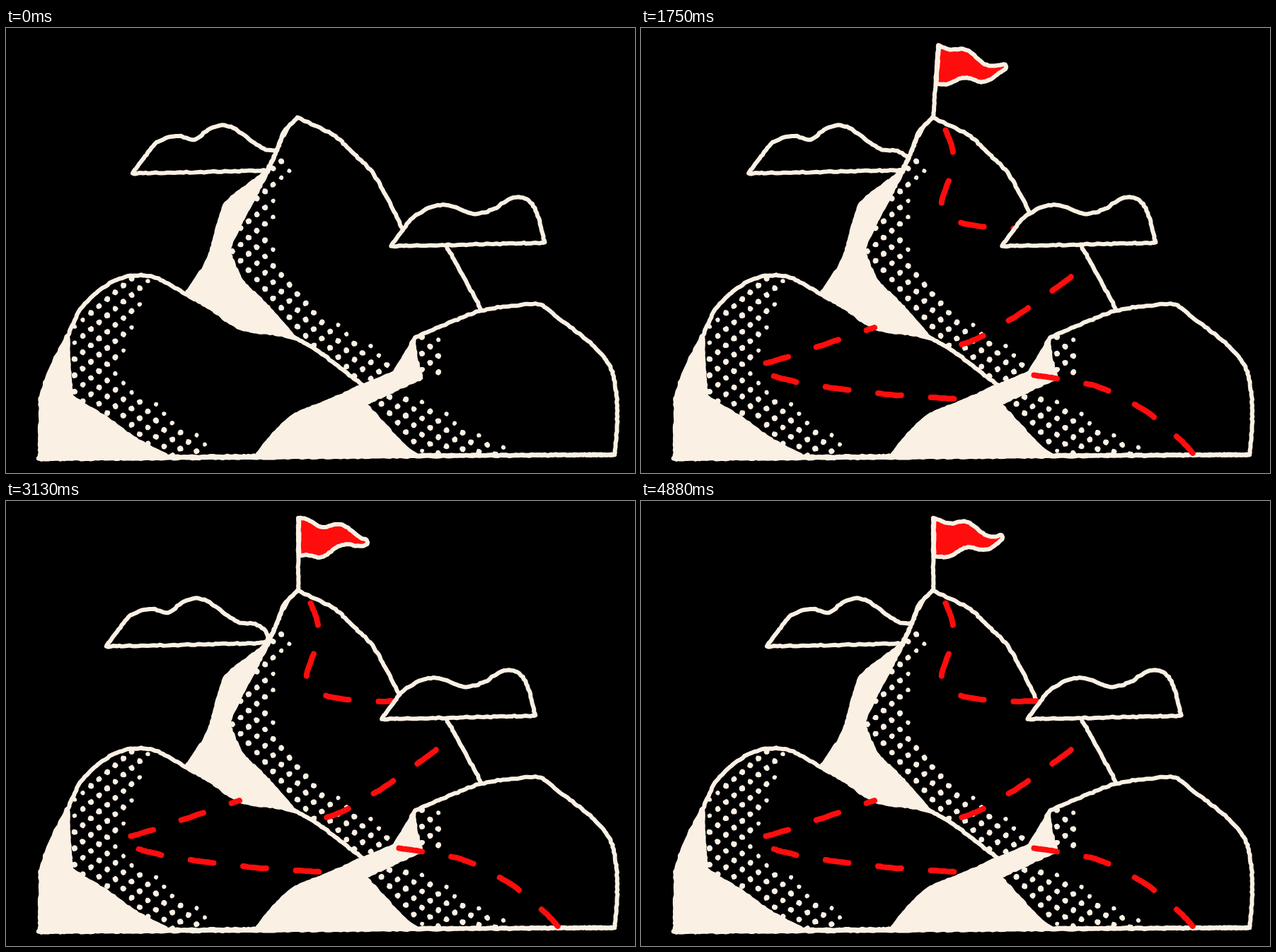
Recreate the animation shown at these times as an HTML page with a canvas. Size 889x630 px, loop 5.01 s.

```html
<!DOCTYPE html>
<html lang="en">
<head>
<meta charset="utf-8">
<title>Mountain trail</title>
<style>
  html, body { margin: 0; width: 100%; height: 100%; overflow: hidden; background: #000; }
  canvas { display: block; }
</style>
</head>
<body>
<canvas id="stage" width="889" height="630"></canvas>
<script>
const ctx = document.getElementById('stage').getContext('2d');
const CREAM = '#faf0e4', RED = '#ff0d0d', BLACK = '#000';
const LOOP = 5010, STEP = 125, TAU = Math.PI * 2;

const hash = n => {
  const v = Math.sin(n * 127.1 + 11.7) * 43758.5453;
  return v - Math.floor(v);
};
const clamp = v => Math.max(0, Math.min(1, v));
const smooth = v => { v = clamp(v); return v * v * (3 - 2 * v); };
const lerp = (a, b, u) => a + (b - a) * u;
const gap = (a, b) => Math.hypot(b[0] - a[0], b[1] - a[1]);

// "x,y x,y": a leading "!" makes the point a sharp corner
function parse(text) {
  return text.trim().split(/\s+/).flatMap(word => {
    const p = word.replace('!', '').split(',').map(Number);
    return word[0] === '!' ? [p, p] : [p];
  });
}

// Points along a smooth curve, shaken a little for a hand-printed edge
function spline(pts, closed, wobble = 1.5) {
  const n = pts.length, out = [];
  const at = i => closed ? pts[(i + n) % n] : pts[Math.max(0, Math.min(n - 1, i))];
  const shake = k => (hash(out.length * 2 + k + n) - 0.5) * wobble;
  for (let i = 0; i < (closed ? n : n - 1); i++) {
    const [a, b, c, d] = [at(i - 1), at(i), at(i + 1), at(i + 2)];
    const parts = Math.ceil(gap(b, c) / 4);
    for (let j = 0; j < parts; j++) {
      const u = j / parts;
      const q = k => b[k] + 0.5 * u * (c[k] - a[k] + u * (2 * a[k] - 5 * b[k] + 4 * c[k] - d[k]
        + u * (3 * (b[k] - c[k]) + d[k] - a[k])));
      out.push([q(0) + shake(0), q(1) + shake(1)]);
    }
  }
  if (!closed) out.push(pts[n - 1]);
  return out;
}

function toPath(pts, closed) {
  const path = new Path2D();
  pts.forEach(p => path.lineTo(...p));
  if (closed) path.closePath();
  return path;
}

const shape = text => toPath(spline(parse(text), true), true);

// Halftone dots on a skewed lattice, kept within a broad band along a spine
function halftone(land, spine, width, ox, oy) {
  const path = new Path2D();
  const near = (x, y, w) => {
    ctx.lineWidth = w;
    return ctx.isPointInStroke(spine, x, y);
  };
  for (let i = -30; i <= 30; i++) {
    for (let j = -30; j <= 30; j++) {
      const x = ox + i * 11.5, y = oy - i * 9.7 + j * 23;
      if (!near(x, y, width) || !ctx.isPointInPath(land.body, x, y) || ctx.isPointInPath(land.face, x, y)) continue;
      const seed = i * 53 + j * 7;
      const r = near(x, y, width * 0.75) ? 4.2 : 3.2;
      path.moveTo(x + r, y);
      for (let k = 1; k < 9; k++) {
        const a = k * TAU / 9, s = r * (0.88 + hash(seed + k) * 0.26);
        path.lineTo(x + Math.cos(a) * s, y + Math.sin(a) * s);
      }
      path.closePath();
    }
  }
  return path;
}

// left + right form the contour, left + edge enclose the lit face
function makeLand({ left, right, edge, spine, width, origin }) {
  const land = { body: shape(left + ' ' + right), face: shape(left + ' ' + edge) };
  land.dots = halftone(land, new Path2D(spine), width, ...origin);
  return land;
}

const lands = [
  {
    left: '!254,378 286,328 300,280 312,248 !345,221 !368,204 382,175 393,147 !412,127',
    right: '462,151 490,177 523,212 !562,288 !622,308 !672,399 !600,560 !400,560',
    edge: '395,153 372,205 330,285 !317,315 335,356 365,386 !420,448 !300,440',
    spine: 'M375 178L350 240L341 290L346 330L420 425L545 510',
    width: 68, origin: [389, 212]
  },
  {
    left: '!48,609 !49,525 62,485 !90,430',
    right: '105,399 130,373 160,355 187,350 215,355 253,376 290,397 333,425 415,442 !505,506 460,527 410,548 382,572 !354,606',
    edge: '92,480 !95,520 150,555 185,580 !237,608',
    spine: 'M170 345L138 430L106 505L265 620',
    width: 82, origin: [143, 384]
  },
  {
    left: '!354,606 382,572 410,548 460,527 !505,507 !548,489 565,462 !578,438',
    right: '620,420 672,400 720,393 755,392 780,410 825,445 852,476 861,505 864,550 !860,604',
    edge: '583,470 !590,497 550,515 !512,533 560,585 !588,607',
    spine: 'M582 438L590 497M515 520L690 625',
    width: 68, origin: [565, 526]
  }
].map(makeLand);

const base = toPath(spline(parse('46,610 860,604')));
const leftCloud = shape(`!0,0 20,-27 38,-46 65,-53 88,-48 110,-64 130,-68 150,-60 185,-35
  210,-32 225,-22 229,-11 !222,-5`);
const rightCloud = shape(`!0,0 16,-22 31,-40 56,-55 81,-58 106,-49 123,-46 146,-53 166,-66
  183,-69 198,-62 209,-39 !217,-5`);

// Visible legs of the trail from the foot to the top; it is hidden in between
let trailLength = 0, lastEnd = null;
const trail = [
  '782,604 755,576 711,541 643,507 551,491',
  '445,525 353,519 240,505 184,492',
  '174,475 212,464 330,424',
  '450,449 487,434 551,394 612,349',
  '562,283 507,283 450,275 425,252 435,215 442,181 430,142'
].map(text => {
  const pts = spline(parse(text), false, 0.8);
  if (lastEnd) trailLength += gap(lastEnd, pts[0]);
  const start = trailLength;
  pts.forEach((p, i) => { if (i) trailLength += gap(pts[i - 1], p); });
  lastEnd = pts[pts.length - 1];
  return { pts, start };
});

function fill(path, color) {
  ctx.fillStyle = color;
  ctx.fill(path);
}

function stroke(path, color = CREAM, width = 6) {
  ctx.strokeStyle = color;
  ctx.lineWidth = width;
  ctx.stroke(path);
}

function drawCloud(path, x, y) {
  ctx.save();
  ctx.translate(x, y);
  fill(path, BLACK);
  stroke(path);
  ctx.restore();
}

function drawLand({ body, face, dots }) {
  fill(body, BLACK);
  fill(face, CREAM);
  stroke(body);
  fill(dots, CREAM);
}

function drawTrail(t) {
  const reach = smooth(t / 1460) * trailLength;
  ctx.save();
  ctx.setLineDash([33, 42]);
  ctx.lineDashOffset = -3;
  for (const { pts, start } of trail) {
    let run = start;
    const shown = pts.filter((p, i) => {
      if (i) run += gap(pts[i - 1], p);
      return run < reach;
    });
    if (shown.length > 1) stroke(toPath(shown), RED, 8);
  }
  ctx.restore();
}

function drawFlag(t) {
  const grow = smooth((t - 1300) / 400);
  if (!grow) return;
  const tilt = t < 1750 ? lerp(-30, 4, smooth((t - 1300) / 450)) : 4 * (1 - smooth((t - 1750) / 300));
  const crest = 70 + 63 * (t - 1750) / 1000;
  const wave = x => 5.5 * Math.min(1, x / 30) * Math.cos(TAU * (x - crest) / 63);
  const top = [], bottom = [];
  for (let i = 0; i <= 12; i++) {
    const u = i / 12, x = 1 + u * 96;
    const bulge = Math.sin(Math.PI * u);
    top.push([x, lerp(-101, -75, u) - 1.5 * bulge + wave(x)]);
    bottom.unshift([x, lerp(-47, -69, u) + 4 * bulge + wave(x)]);
  }
  const cloth = toPath(spline([top[0], ...top, ...bottom, bottom[12]], true, 1), true);
  ctx.save();
  ctx.translate(413, 125);
  ctx.rotate(tilt * Math.PI / 180);
  ctx.scale(grow, grow);
  fill(cloth, RED);
  stroke(cloth);
  stroke(toPath(spline([[0, 0], [0, -101]], false, 1)));
  ctx.restore();
}

function draw(t) {
  const sway = peakAt => 20.3 * Math.cos(TAU * (t - peakAt) / 5000);
  ctx.lineJoin = ctx.lineCap = 'round';
  ctx.fillStyle = BLACK;
  ctx.fillRect(0, 0, 889, 630);
  drawCloud(leftCloud, 159 + sway(210), 206);
  lands.forEach(drawLand);
  stroke(base, CREAM, 6.5);
  drawTrail(t);
  drawCloud(rightCloud, 530 + sway(4350), 309);
  drawFlag(t);
}

const begin = performance.now();
let shown = -1;
function tick() {
  const t = (performance.now() - begin) % LOOP;
  let step = Math.min(39, Math.floor(t / STEP));
  if (t < Math.ceil(step * STEP / 10) * 10) step--;
  if (step !== shown) draw((shown = step) * STEP);
  requestAnimationFrame(tick);
}
tick();
</script>
</body>
</html>
```
